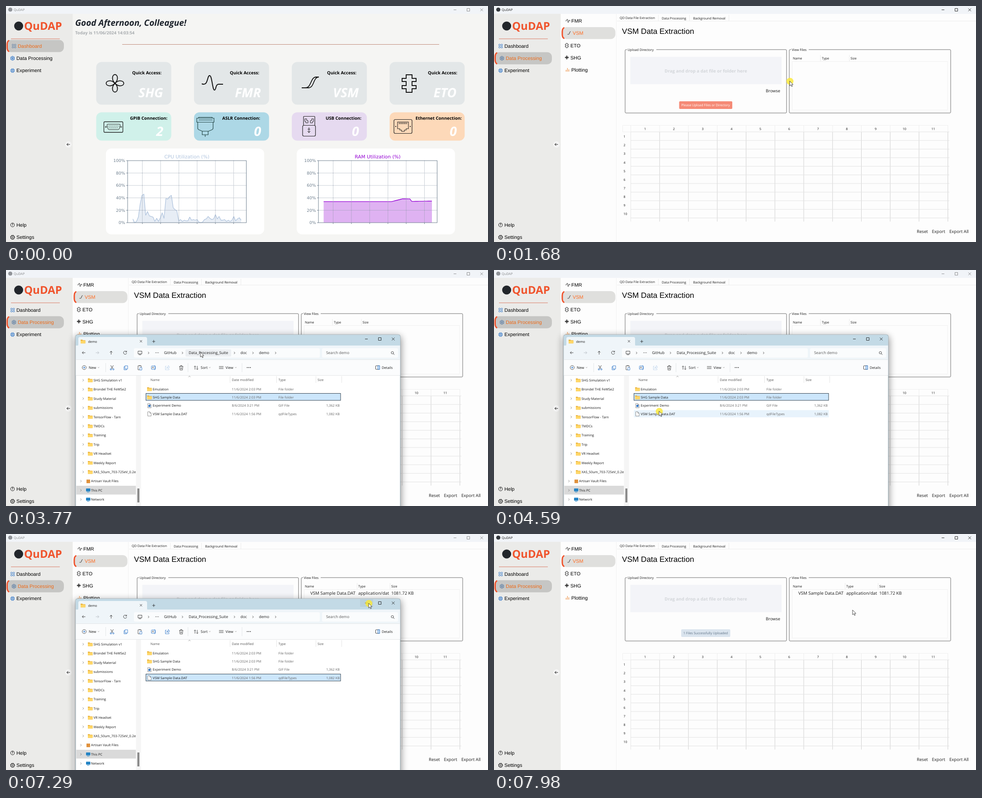
An HTML page that plays this animation: 1066 px wide and 525 px high, repeating every 8000 ms.

```html
<!DOCTYPE html>
<html lang="en">
<head>
<meta charset="utf-8">
<title>QuDAP</title>
<style>
html, body { margin: 0; width: 100%; height: 100%; overflow: hidden; background: #f5f5f3; }
svg { display: block; font-family: "Open Sans", "Noto Sans", sans-serif; text-rendering: geometricPrecision; }
.arial { font-family: "Liberation Sans", Arial, sans-serif; }
.plot { font-family: "DejaVu Sans", sans-serif; }
.bold { font-weight: 700; }
.big { font-weight: 700; font-style: italic; }
.shadow { filter: blur(8px); opacity: .42; }
text { white-space: pre; }
</style>
</head>
<body>
<svg id="stage" width="1066" height="525" viewBox="0 0 1066 525"></svg>
<script>
const ORANGE = '#ff6c22', BLUE = '#2f76c9', INK = '#1b1b1b';

// y is the vertical middle of the capitals
const text = (x, y, s, size, fill = INK, cls = '', anchor = 'start') =>
  `<text x="${x}" y="${y + size * 0.355}" font-size="${size}" fill="${fill}" class="${cls}" text-anchor="${anchor}">${s}</text>`;
const rect = (x, y, w, h, fill, r = 0, stroke = 'none', sw = 1) =>
  `<rect x="${x}" y="${y}" width="${w}" height="${h}" rx="${r}" fill="${fill}" stroke="${stroke}" stroke-width="${sw}"/>`;
const path = (d, stroke = INK, sw = 1, fill = 'none', more = '') =>
  `<path d="${d}" stroke="${stroke}" stroke-width="${sw}" fill="${fill}" ${more}/>`;
const dot = (x, y, r, fill, stroke = 'none', sw = 1, more = '') =>
  `<circle cx="${x}" cy="${y}" r="${r}" fill="${fill}" stroke="${stroke}" stroke-width="${sw}" ${more}/>`;
const group = (id, body) => `<g id="${id}">${body}</g>`;
const each = (n, f) => Array.from({ length: n }, (_, i) => f(i)).join('');
const windowButtons = (x, y, gap) =>
  path(`M${x - 3} ${y}h6M${x + gap - 3} ${y - 3}h6v6h-6zM${x + 2 * gap - 3} ${y - 3}l6 6m0 -6l-6 6`, INK, 0.9);

// ---- shared sidebar ----
const icons = {
  Dashboard: (x, y, c) => each(4, i => rect(x - 4 + (i % 2) * 5, y - 4 + (i >> 1) * 5, 3.4, 3.4, 'none', 1.3, c)),
  'Data Processing': (x, y, c) =>
    path(`M${x} ${y - 4.6}l4 2.3v4.6l-4 2.3l-4 -2.3v-4.6zM${x - 2} ${y - 1}l2 1l2 -1M${x} ${y}v2.5`, c, 1.1) + dot(x, y, 2.2, 'none', c, .8),
  Experiment: (x, y, c) => rect(x - 3, y - 3, 6, 6, 'none', 1, c, 1.1) + rect(x - 1, y - 1, 2, 2, 'none', 0, c, .8) +
    path(`M${x - 1.5} ${y - 5}v2m3 -2v2m0 6v2m-3 -2v2M${x - 5} ${y - 1.5}h2m-2 3h2m6 -3h2m-2 3h2`, c, .9)
};
const pill = (x, y, w, h, fill) => rect(x, y, w, h, fill, 10) +
  path(`M${x + 6} ${y + 1}Q${x + 1.5} ${y + 3} ${x + 1.5} ${y + 10}V${y + h - 10}Q${x + 1.5} ${y + h - 3} ${x + 6} ${y + h - 1}`, '#f0542d', 3);

const sidebar = selected =>
  rect(0, 17, 147.5, 508, '#ebebe9') + dot(28, 44.5, 10, '#22262b') +
  text(40, 44.5, 'QuDAP', 24, '#f0542d', 'bold') + path('M11 73H119', '#d97863', 1) +
  Object.keys(icons).map((name, i) => {
    const y = 89 + 27.3 * i, on = i === selected;
    return (on ? pill(1, y - 13.5, 127, 27, '#c6c6c4') : '') +
      icons[name](on ? 17.5 : 14.5, y, on ? '#5d7fa6' : BLUE) +
      text(on ? 26 : 23, y, name, 10.9, on ? '#ed6a18' : '#000', 'arial');
  }).join('') +
  dot(138, 308, 7, '#f5f5f5') + path('M141.5 308h-7m3 -3l-3 3l3 3', '#111', 1) +
  dot(14.5, 487, 4.3, 'none', INK, 1) + text(14.5, 487, '?', 7, INK, 'bold', 'middle') +
  text(23, 487.5, 'Help', 10.9, '#000', 'arial') +
  dot(14.5, 514.5, 3.9, 'none', INK, 1.1) + dot(14.5, 514.5, 4.8, 'none', INK, 1, 'stroke-dasharray="1.9 1.87"') +
  dot(14.5, 514.5, 1.5, 'none', INK) + text(23, 514.5, 'Settings', 10.9, '#000', 'arial');

// ---- dashboard ----
const cardX = i => 199.5 + 216.3 * i;
const petal = a => `<path transform="translate(241 172) rotate(${a})" d="M0 0C-9 -9 -5.5 -19.5 0 -19.5S9 -9 0 0" fill="none" stroke="#111" stroke-width="1.8"/>`;
const quick = [
  ['SHG', 344, [0, 90, 180, 270].map(petal).join('')],
  ['FMR', 560, path('M433 173C442 177 444 170 447 159C449 153 452 153 454 161C457 174 458 187 461 187C465 187 463 173 471 174H480', '#111', 2)],
  ['VSM', 775, path('M654 182H662C676 182 673 158 686 158H692M660 182H669C682 182 679 158 692 158', '#111', 1.8)],
  ['ETO', 998, path('M885 153H898V161H907V168H898V177H907V184H898V192H885V184H876V177H885V168H876V161H885Z', '#111', 1.9)]
];
const links = [
  ['GPIB', 357, 2, '#d0f1ea', rect(216.5, 257.5, 42, 23.5, 'none', 2, '#222', 1.3) +
    path('M225 263h26q2 0 1.5 2l-2 8q-.5 2 -2.5 2h-20q-2 0 -2.5 -2l-2 -8q-.5 -2 1.5 -2z', '#222', 1) +
    path('M227 267h22M228 271h20', '#222', 1.4, 'none', 'stroke-dasharray="1 1.6"') + dot(221, 269, 1.4, 'none', '#222') + dot(254.5, 269, 1.4, 'none', '#222')],
  ['ASLR', 562, 0, '#add8e6', path('M422 249.5h38v9h-38zM426 249.5v-2h30v2M424 258.5v13q0 3 3 4l7 3h14l7 -3q3 -1 3 -4v-13M426 253.5h31M434 278.5v8h13v-8M440.5 287v4', '#244', 1.2)],
  ['USB', 786, 0, '#e6daf0', rect(658, 245.5, 25, 20, 'none', 1, '#222', 1.2) + rect(656, 265.5, 28.5, 24, 'none', 3, '#222', 1.2) +
    path('M661 251h4v4h3v5h-5v-3h-2zM680 251h-4v4h-3v5h5v-3h2zM670 270v12m-3 -4l3 4l3 -4m-6 -4h6', '#222', 1)],
  ['Ethernet', 1008, 0, '#fdd9b9', rect(858, 252.5, 40, 31, 'none', 3, '#222', 1.2) +
    path('M866 258h24v15h-5v3h-4v3h-6v-3h-4v-3h-5z', '#222', 1.1) + path('M869 261h18', '#222', 3.5, 'none', 'stroke-dasharray="1 1.4"') +
    path('M861 268h2m30 0h2', '#222', 2)]
];

const cpu = [6, 0, 2, 9, 30, 44, 46, 12, 18, 11, 10, 9, 2, 7, 2, 8, 16, 7, 39, 38, 42, 44, 24, 21, 19, 3, 5, 2, 4, 3, 3, 9, 4, 5, 4,
  5, 1, 0, 1, 5, 6, 10, 7, 5, 6, 13, 6, 10, 4, 4, 5, 2, 4, 2, 4, 10, 3, 6, 8, 4, 6, 3];
const ram = i => i < 37 ? 34 : i < 43 ? 34 + (i - 37) * .74 : i < 48 ? 38.5 - (i - 43) * .06 : 34.3 + (i - 48) * .05;

const chart = (id, x, color, title) => {
  const dashes = d => path(d, '#8a97a6', .7, 'none', 'stroke-dasharray="2 1"');
  return `<g transform="translate(${x} 0)">` + rect(221, 317, 350, 191, '#fff', 12) +
    text(400, 335.5, title, 10.6, color, 'plot', 'middle') +
    path('M280 482', 'none', 0, color, `id="${id}Fill" fill-opacity=".3"`) +
    path('M280 482', color, 1.3, 'none', `id="${id}Line" stroke-linejoin="round"`) +
    each(6, i => dashes(`M${301.5 + 40.4 * i} 344V482`) + path(`M${301.5 + 40.4 * i} 482v3`, '#708090')) +
    each(6, i => {
      const y = 482 - 27.6 * i;
      return (i % 5 ? dashes(`M269 ${y}H531.5`) : '') +
        path(`M266 ${y}h3`, '#708090') + text(263.5, y, 20 * i + '%', 9.1, '#708090', 'plot', 'end');
    }) + rect(269, 344, 262.5, 138, 'none', 0, '#708090') + '</g>';
};

const card = (i, y, h, fill, body) => `<g class="card" data-x="${cardX(i)}" data-y="${y}" data-h="${h}">${rect(cardX(i), y, 166, h, fill, 12)}</g>${body}`;
const dashboard = rect(147, 17, 919, 508, '#f5f5f3') + sidebar(0) +
  text(153, 37.5, 'Good Afternoon, Colleague!', 19, '#1c222b', 'big') +
  group('clock', text(153, 60, '', 9.45, '#a9adb0', 'bold')) +
  path('M257 85.5H958', '#c08a78', 1) +
  quick.map(([name, end, icon], i) => card(i, 124.5, 95, '#e3e7e8', icon +
    text(end, 148.5, 'Quick Access:', 9.65, '#000', 'bold', 'end') + text(347.5 + 216.3 * i, 193, name, 28.5, '#fff', 'big', 'end'))).join('') +
  links.map(([name, end, n, fill, icon], i) => card(i, 236.5, 63, fill, icon +
    text(end, 249.5, name + ' Connection:', 9.65, '#000', 'bold', 'end') + text(348 + 216.3 * i, 279, n, 28.5, '#fff', 'big', 'end'))).join('') +
  chart('cpu', 0, '#b0c4de', 'CPU Utilization (%)') + chart('ram', 422, '#9400d3', 'RAM Utilization (%)');

// ---- data extraction page ----
const subMenu = [
  ['FMR', path('M158 33h2l2 -4l2 8l2 -6l1 2h2', '#333', .9)],
  ['VSM', path('M162 63h3c3 0 1 -6 5 -6M164 63c4 0 2 -6 5 -6', '#555', .9)],
  ['ETO', path('M159.5 83h3v2h2v2h-2v2h2v2h-2v2h-3v-2h-2v-2h2v-2h-2v-2h2z', '#333', .9)],
  ['SHG', path('M161 114.5c-3 -5 3 -5 0 0c-3 5 3 5 0 0c5 -3 5 3 0 0c-5 3 -5 -3 0 0', '#333', 1.1)],
  ['Plotting', path('M159.5 146v-4m3 4v-8m3 8v-5', '#f0a060', 1.4)]
];
const box = (x, w, title, tw) => rect(x, 97, w, 141, 'none', 2, '#6b6b6b') + rect(x + 4, 92, tw, 9, '#fdfdfd') + text(x + 5.5, 97, title, 7.3);
const headers = (xs, seps) => ['Name', 'Type', 'Size'].map((s, i) => text(xs[i], 116.5, s, 7.3)).join('') +
  seps.map(x => path(`M${x} 109v14`, '#e8e8e8')).join('');

const extraction = rect(147, 17, 919, 508, '#fdfdfd') + sidebar(1) + path('M270.5 18V525', '#f1f1f1') +
  pill(149.5, 47, 119, 26.5, '#dfdfdd') +
  subMenu.map(([s, icon], i) => icon + text(i === 1 ? 174 : i > 1 ? 169 + (i > 3) * 2 : 171, 33 + 27.4 * i, s, 10.9, i === 1 ? ORANGE : '#000', 'arial')).join('') +
  path('M272 33.5H1066M363.5 20v13M432.5 20v13M519.5 20v13', '#ececec') +
  text(278, 26.5, 'QD Data File Extraction', 7.25) + text(371, 27, 'Data Processing', 7.25) + text(440.5, 27, 'Background Removal', 7.25) +
  text(283, 55.5, 'VSM Data Extraction', 17.2, '#000', 'arial') +
  box(290, 357, 'Upload Directory', 65) + box(653, 357, 'View Files', 39) +
  rect(301.5, 113, 334.5, 61, '#f3f4f8') + text(468.5, 144.5, 'Drag and drop a dat file or folder here', 9.7, '#d3d6da', 'bold', 'middle') +
  text(601, 189, 'Browse', 9.3) + rect(659.5, 123.5, 343.5, 108, 'none', 0, '#f0f0f0') +
  group('empty', headers([661, 725, 788.5], [722, 786]) + rect(409.5, 212, 117.5, 17, '#f58a76', 2) +
    text(468, 220.5, 'Please Upload Files or Directory', 7.27, '#fff', '', 'middle')) +
  group('loaded', headers([661, 779, 852], [776.5, 849.5]) + rect(414, 212, 108.5, 17, '#dae4ee', 2) +
    text(468, 220.5, '1 Files Successfully Uploaded', 7.27, '#5f7286', '', 'middle') +
    text(673, 132, 'VSM Sample Data.DAT', 9.7) + text(779, 132, 'application/dat', 9.7) + text(852, 132, '1081.72 KB', 9.5)) +
  '<clipPath id="sheet"><rect x="283" y="264" width="724" height="215.5"/></clipPath><g clip-path="url(#sheet)">' +
  path('M284.5 280V265.5H1004M284 280H302', '#f0f0f0') +
  each(12, i => path(`M${302.5 + 63.75 * i} 265v14`, '#eee') + path(`M${302.5 + 63.75 * i} 280V480`, i ? '#cfcfcf' : '#e6e6e6')) +
  each(11, i => path(`M302 ${280 + 19.15 * i}H1007`, '#e2e2e2') + text(334 + 63.75 * i, 273, i + 1, 7.2, INK, '', 'middle') +
    text(288.5 + (i > 8) * 2, 290.5 + 19.15 * i, i + 1, 7.2, INK, '', 'middle')) + '</g>' +
  text(935, 501.5, 'Reset', 9.6) + text(968.5, 501.5, 'Export', 9.6) + text(1007, 501.5, 'Export All', 9.6);

// ---- file explorer ----
const folder = (x, y) => path(`M${x} ${y - 4}h4l1 1.2h5.5v7h-10.5z`, 'none', 0, '#e9b23c') + rect(x, y - 1.8, 10.5, 6, '#ffd768', .8);
const page = (x, y) => path(`M${x} ${y - 4.5}h4.5l3 3v6.5h-7.5zM${x + 4.5} ${y - 4.5}v3h3`, '#777', .8, '#fff');
const chevron = (x, y, c = '#444') => path(`M${x} ${y - 2.3}l2.4 2.3l-2.4 2.3`, c, .9);
const monitor = (x, y, c) => rect(x, y - 4, 9.5, 6.5, c, 1) + path(`M${x + 2} ${y + 4}h5.5`, c, 1);
const tree = ['SHG Simulation v1', 'Brondel THE FeWSe2', 'Study Material', 'submissions', 'TensorFlow - Tarn', 'TMDCs', 'Training', 'Trip',
  'VR Headset', 'Weekly Report', 'XAS_50um_703-725eV_0.2e', 'Artisan Vault Files', 'This PC', 'Network'];
const files = [['Emulation', '11/6/2024 2:03 PM', 'File folder', ''], ['SHG Sample Data', '11/6/2024 2:03 PM', 'File folder', ''],
  ['Experiment Demo', '8/6/2024 3:21 PM', 'GIF File', '1,362 KB'], ['VSM Sample Data.DAT', '11/6/2024 1:56 PM', 'qdFileTypes', '1,082 KB']];
const rowY = i => 264.8 + 18.3 * i;

const frame = `<g class="shadow">${rect(152, 147, 722, 400, '#000', 6)}</g>` + rect(154, 144, 718, 390, '#fff', 4, '#8fa3ad') +
  path('M154.5 168V148q0 -3.5 3.5 -3.5H868q3.5 0 3.5 3.5V168Z', 'none', 0, '#c3dae6') +
  path('M157 169q3 0 3 -4V153q0 -4 4 -4H308q4 0 4 4V165q0 4 3 4Z', 'none', 0, '#eff5f9') + rect(154.5, 168, 717, 31, '#eff5f9') +
  folder(165, 159) + text(181.5, 159, 'demo', 7.4) + path('M296 156l5 5m0 -5l-5 5M323.5 159h6.5M326.7 155.7v6.5', INK, .8) +
  '<rect id="minHover" x="783" y="145" width="29" height="17" fill="#b9d0dc"/>' + windowButtons(797, 153.5, 29.7);

const addressBar =
  path('M175.5 184h-7m3 -3l-3 3l3 3M232.5 188v-7.5m-3 3l3 -3l3 3M266.5 182a3.6 3.6 0 1 0 .5 2.7m-.2 -5v2.7h-2.7', '#333', .9) +
  path('M198.5 184h7m-3 -3l3 3l-3 3', '#b5bcc2', .9) +
  rect(283, 174, 411, 21, '#fafcfd', 3) + rect(699, 174, 168, 21, '#fafcfd', 3) +
  '<rect id="crumbHover" x="397" y="176.5" width="101" height="16" rx="2" fill="#eceff2"/>' +
  path('M292 180.5h8.5v6h-8.5zM293.5 188.5h5.5', '#333', .9) + [331, 334, 337].map(x => dot(x, 184, .7, INK)).join('') +
  [314, 389, 504, 545, 595].map(x => chevron(x, 184.5)).join('') +
  text(349.5, 184.5, 'GitHub', 8.4) + text(404, 184.5, 'Data_Processing_Suite', 8.4) + text(518.5, 184.5, 'doc', 8.4) + text(559.5, 184.5, 'demo', 8.4) +
  text(708, 184.5, 'Search demo', 8.4, '#555') + dot(854.5, 184, 2.6, 'none', '#333', .9) + path('M856.5 186l2.5 2.5', '#333');

const toolbar = rect(154.5, 199, 717, 35, '#fbfcfd') + path('M154.5 199.5H871M154.5 234.5H871', '#e3e6e8') +
  dot(173, 217, 4.5, 'none', '#333', .8) + path('M170.5 217h5m-2.5 -2.5v5', BLUE) + text(183, 217.5, 'New', 8) +
  path('M203 216l1.7 1.7l1.7 -1.7M449 216l1.7 1.7l1.7 -1.7M506.5 216l1.7 1.7l1.7 -1.7', '#777', .7) + path('M220.5 207v20M402.5 207v20M522 207v20', '#e3e6e8') +
  path('M231.5 212l5 8m1 -8l-5 8', '#333', .9) + dot(232, 221, 1.5, 'none', BLUE) + dot(237.5, 221, 1.5, 'none', BLUE) +
  path('M263 213h6v7h-6zM263 215h-2v7h6v-2', BLUE, .9) + path('M292 213h7v9h-7zM294 212.5h3.5', '#444', .9) + rect(296, 217, 4.5, 5.5, '#fff', .5, BLUE, .9) +
  rect(321.5, 213.5, 9, 7.5, 'none', 1, BLUE, .9) + text(323, 217.3, 'A', 6) + path('M329 212v10.5', BLUE, .8) +
  group('share', path('M355 214h-2.5v8h8v-2M355 219q1 -4 4 -4v-2.5l3 3.5l-3 3.3v-2q-2 0 -4 1.7z', BLUE, .9)) +
  path('M383 214.5h9M386 214.5v-2h3v2M384 214.5l.8 8h5.5l.8 -8M386.7 217v3.5m1.8 -3.5v3.5', '#444', .9) +
  path('M418 221.5v-8m-2 2l2 -2l2 2M423 213.5v8m-2 -2l2 2l2 -2', '#333', .9) + text(430.5, 217.5, 'Sort', 8) +
  path('M471 214.5h10m-10 2.5h10m-10 2.5h10', '#444', .8) + text(485.5, 217.5, 'View', 8) + [533.5, 537, 540.5].map(x => dot(x, 217, .9, INK)).join('') +
  rect(817.5, 213, 9, 8, 'none', 1, '#333', .9) + rect(822.5, 213, 4, 8, '#cfe4f6', 0, BLUE, .9) + text(831, 217.5, 'Details', 7.6);

const treePane = rect(155.5, 480, 132, 19.5, '#dadada') +
  tree.map((name, i) => {
    const y = 245.3 + 20.4 * i, root = i > 10, x = root ? 177 : 181;
    const icon = i === 11 ? rect(178, y - 3.5, 8, 8, '#e0913c') : root ? monitor(x, y, '#2383c4') : folder(x, y);
    return chevron(root ? 164.5 : 169.5, y, '#777') + icon + text(root ? 188 : 193.5, y, name, 7.4);
  }).join('') +
  rect(287.5, 235, 11, 290, '#f5f5f5') + rect(290.5, 486, 4.5, 31, '#8a8a8a');

const fileList = path('M495.5 236v15M598.5 236v15M685.5 236v15M742.5 236v15', '#e5e5e5') + path('M403.5 238l2.2 -2l2.2 2', '#777', .8) +
  ['Name', 'Date modified', 'Type', 'Size'].map((s, i) => text([319.5, 499.5, 602.5, 689][i], 244.3, s, 7.3, '#555')).join('') +
  '<rect id="rowHover" x="309.5" width="431" height="16" fill="#e8f3fc"/><rect id="rowSelect" x="309.5" width="430.5" height="15.5" fill="#cce6fb" stroke="#33424f"/>' +
  files.map(([name, date, type, size], i) => {
    const y = rowY(i) + .2;
    return (i < 2 ? folder(312, y) : page(313.5, y)) + (i === 2 ? rect(315, y - 1.5, 4.5, 4.5, BLUE) : '') +
      text(324.5, y, name, 7.4) + text(499.5, y, date, 7.45, '#666') + text(602.5, y, type, 7.35, '#666') + text(738, y, size, 7.35, '#666', '', 'end');
  }).join('');

document.getElementById('stage').innerHTML =
  group('dashboard', dashboard) + group('extraction', extraction) +
  rect(0, 0, 1066, 17.5, '#f1f4f8') + group('title', dot(9.5, 8, 4.6, '#33373c') + text(17, 8.5, 'QuDAP', 7.3) + windowButtons(993, 8.5, 29.5)) +
  group('explorer', frame + addressBar + toolbar + treePane + fileList) +
  group('drag', rect(-31.5, -57.5, 64, 64, '#f4f5f6dd', 2, '#777') + path('M-19 -53H11L21.5 -42V1.5H-19ZM11 -53V-42H21.5', '#888', 1, '#fafafa')) +
  group('copyTip', rect(9, 9.5, 34, 12, '#fff', 1.5, '#e2e2e2', .7) + path('M12 15h6m-3 -3v6', '#333', .9) + text(21, 15.5, 'Copy', 7.5, '#1f3fa8')) +
  group('pointer', dot(.5, .5, 7.8, '#fbe832', 'none', 0, 'id="press" opacity=".8"') + path('M0 0V10.6L2.5 8.3L4.3 12.2L6 11.4L4.3 7.7H7.5Z', '#222', .8, '#fff'));

// ---- motion ----
const $ = id => document.getElementById(id);
const show = (id, on) => $(id).setAttribute('display', on ? 'inline' : 'none');
const between = (t, a, b) => t >= a && t < b;
const ease = k => { k = Math.min(1, Math.max(0, k)); return k * k * (3 - 2 * k); };
const track = [[390, 340, 494], [700, 310, 270], [1140, 470, 190], [1210, 475, 189], [1540, 654, 167], [1740, 654, 167], [2160, 560, 490], [2220, 555, 545],
  [3480, 480, 545], [3770, 430, 183], [3970, 304, 216], [4040, 306, 218], [4450, 365, 314], [4640, 365, 314], [4850, 372, 272], [5050, 372, 272],
  [5580, 523, 124], [5800, 523, 124], [6120, 560, 160], [6690, 560, 160], [7200, 802, 154], [7840, 802, 154], [7980, 793, 169]];

function pointerAt(t) {
  const next = track.findIndex(k => k[0] > t);
  if (next === 0) return [-50, -50];
  if (next < 0) return track.at(-1).slice(1);
  const [t0, x0, y0] = track[next - 1], [t1, x1, y1] = track[next], k = ease((t - t0) / (t1 - t0));
  return [x0 + (x1 - x0) * k, y0 + (y1 - y0) * k];
}

function plot(id, value) {
  const line = each(60, i => `${i ? 'L' : 'M'}${(280.5 + 4.06 * i).toFixed(1)} ${(482 - 1.38 * value(i)).toFixed(1)}`);
  $(id + 'Line').setAttribute('d', line);
  $(id + 'Fill').setAttribute('d', line + 'V482H280.5Z');
}

function render() {
  const t = performance.now() % 8000, [x, y] = pointerAt(t);
  const inside = (l, top, w, h) => x >= l && x < l + w && y >= top && y < top + h;
  const home = t < 1680, dragging = between(t, 4690, 5790);

  show('dashboard', home);
  show('extraction', !home);
  if (home) {
    const tick = t < 70 ? 0 : t < 1070 ? 1 : 2;
    $('clock').firstChild.textContent = `Today is 11/06/2024 14:03:${54 + tick}`;
    plot('cpu', i => cpu[i + tick]);
    plot('ram', i => ram(i + tick));
    document.querySelectorAll('.card').forEach(c => {
      const over = inside(+c.dataset.x, +c.dataset.y, 166, +c.dataset.h);
      c.style.filter = over ? 'drop-shadow(2px 2px 2px #0004)' : 'none';
    });
  }
  $('title').setAttribute('opacity', between(t, 1680, 3220) || t >= 7380 ? 1 : .5);
  show('empty', t < 5920);
  show('loaded', t >= 5920);

  const open = ease((t - 3220) / 230) * (1 - ease((t - 7380) / 240)), scale = .6 + .4 * open;
  show('explorer', open > 0);
  $('explorer').setAttribute('opacity', open);
  $('explorer').setAttribute('transform', `translate(${530 * (1 - scale)} ${620 * (1 - scale)}) scale(${scale})`);
  const row = Math.floor((y - 255.7) / 18.3);
  show('rowHover', !dragging && row >= 0 && row < 4 && inside(309, 255, 431, 75));
  $('rowHover').setAttribute('y', rowY(row) - 8);
  $('rowSelect').setAttribute('y', Math.round(rowY(t < 4650 ? 1 : 3) - 9) + .5);
  $('share').setAttribute('opacity', t < 4650 ? .3 : 1);
  show('crumbHover', inside(397, 176, 101, 17));
  show('minHover', inside(783, 144, 29, 18));

  for (const id of ['drag', 'copyTip', 'pointer']) $(id).setAttribute('transform', `translate(${x} ${y})`);
  show('drag', dragging);
  show('copyTip', dragging && y < 144);
  show('press', between(t, 1640, 1800) || between(t, 4580, 5790) || between(t, 7270, 7400));
  requestAnimationFrame(render);
}
render();
</script>
</body>
</html>
```
